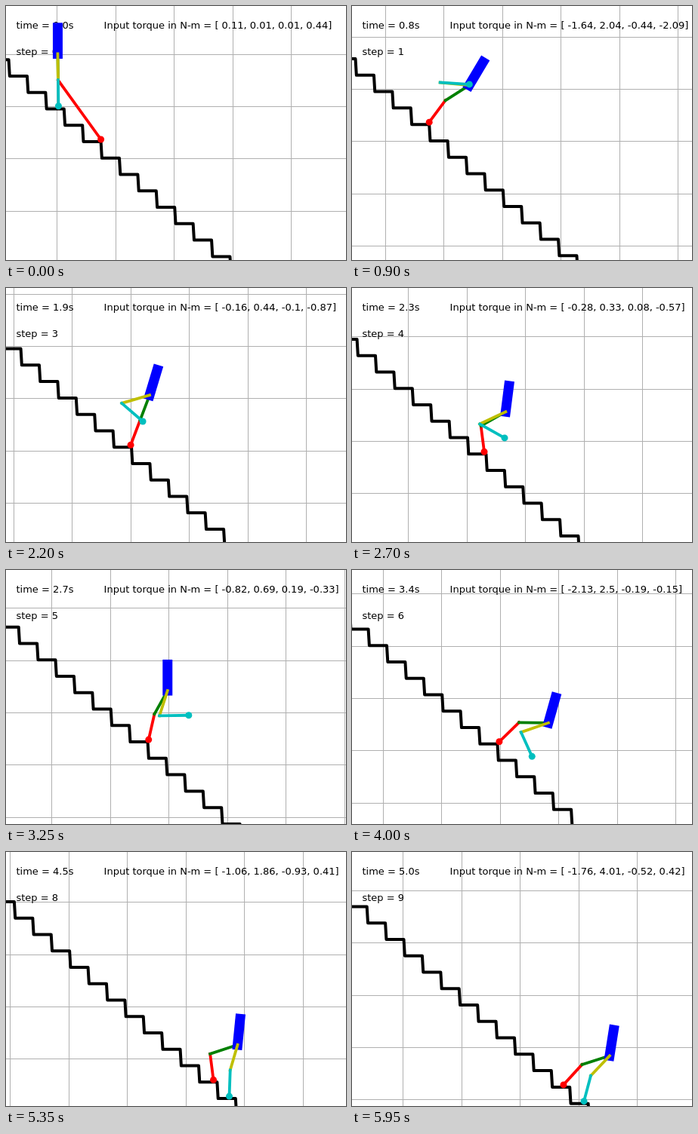
An HTML page that plays this animation: 450x337 px, repeating every 6 s.

```html
<!DOCTYPE html>
<html lang="en">
<head>
<meta charset="utf-8">
<title>Walker descending stairs</title>
<style>
html, body { margin: 0; width: 100%; height: 100%; overflow: hidden; background: #fff; }
svg { display: block; width: 450px; height: 337px; }
text { font: 13px "DejaVu Sans", sans-serif; white-space: pre; }
path, line { fill: none; }
.link { stroke-width: 3.8; stroke-linecap: square; }
</style>
</head>
<body>
<svg viewBox="0 0 450 337">
  <path id="grid" stroke="#b0b0b0" stroke-width="1"/>
  <path id="stairs" stroke="#000" stroke-width="4" stroke-linejoin="round"/>
  <text id="time" x="13.5" y="30"></text>
  <text id="step" x="13.5" y="65"></text>
  <text id="torque" x="129.6" y="30"></text>
  <line id="shin" class="link" stroke="#f00"/>
  <line id="thigh" class="link" stroke="#008000"/>
  <line id="body" stroke="#00f" stroke-width="13" stroke-linecap="square"/>
  <line id="swingThigh" class="link" stroke="#bfbf00"/>
  <line id="swingShin" class="link" stroke="#00bfbf"/>
  <circle id="foot" r="4.5" fill="#f00"/>
  <circle id="swingFoot" r="4.5" fill="#00bfbf"/>
</svg>
<script>
const FRAMES = 120, FRAME_MS = 50, STEP_FRAMES = 12, SECONDS_PER_FRAME = .0422;
const GRID = [77.5, 69.35], CAMERA = [1.3, 1.27];
const STAIR = [24.41, 21.77], CORNER = [125.6, 180];
const ASPECT = GRID[0] / GRID[1];   // vertical units are shorter on screen
const LINK = GRID[0] / 2, FOOT_LIFT = 3;

// Footholds, counted in stairs from the first foothold
const feet = [-2.3, 0, 1.9, 3.96, 4.9, 6.05, 7.1, 9.5, 11.8, 12.66, 13.77].map(s => [
  CORNER[0] + STAIR[0] * s,
  CORNER[1] + STAIR[1] * Math.ceil(s - .2) - FOOT_LIFT
]);

// Key poses: hip relative to the support foot, lean and [thigh, shin] in degrees
const poses = [
  { at: 0, hip: [-1, -70], lean: 0, torque: [.11, .01, .01, .44] },
  { at: 18, hip: [53, -49], lean: 28, swing: [-96, 86], torque: [-1.64, 2.04, -.44, -2.09] },
  { at: 44, hip: [25, -66], lean: 15, swing: [-72, 46], torque: [-.16, .44, -.1, -.87] },
  { at: 65, hip: [25, -65], lean: 0, swing: [-16, 91], torque: [-.82, .69, .19, -.33] },
  { at: 80, hip: [65, -25], lean: 14, swing: [-69, 22], torque: [-2.13, 2.5, -.19, -.15] },
  { at: 95, hip: [61, -28], lean: 4, torque: [-.69, .39, -1.13, .34] },
  { at: 119, hip: [61, -38.5], lean: 8, torque: [-1.76, 4.01, -.52, .42] }
];
const defaultSwing = { at: 6, swing: [-62, 58] };
const touchdownHip = [14, -66];

const $ = id => document.getElementById(id);
const rad = deg => deg * Math.PI / 180;
const add = (a, b) => a.map((v, i) => v + b[i]);
const stepAt = n => Math.floor(n / STEP_FRAMES);
const set = (id, attrs) => { for (const k in attrs) $(id).setAttribute(k, attrs[k]); };
const track = value => poses.map(p => [p.at].concat(value(p)));

const leanKeys = track(p => p.lean);
const torqueKeys = track(p => p.torque);
const hipKeys = track(p => add(feet[stepAt(p.at)], p.hip));
// Each touchdown brings the hip just ahead of the new support foot
for (let s = 1; s * STEP_FRAMES < FRAMES; s++) {
  const at = s * STEP_FRAMES;
  if (poses.every(p => Math.abs(p.at - at) > 2)) hipKeys.push([at, ...add(feet[s], touchdownHip)]);
}
hipKeys.sort((a, b) => a[0] - b[0]);

// Smooth curve through keys of the form [frame, ...values]
function spline(keys, n) {
  let i = 0;
  while (i < keys.length - 2 && keys[i + 1][0] <= n) i++;
  const a = keys[i], b = keys[i + 1], before = keys[i - 1] || a, after = keys[i + 2] || b;
  const span = b[0] - a[0], u = (n - a[0]) / span;
  return a.slice(1).map((p, j) => {
    const k = j + 1, c = b[k] - p;
    const m0 = (b[k] - before[k]) / (b[0] - before[0]) * span;
    const m1 = (after[k] - p) / (after[0] - a[0]) * span;
    return p + u * (m0 + u * (3 * c - 2 * m0 - m1 + u * (m0 + m1 - 2 * c)));
  });
}

const offset = (p, angle, length) =>
  add(p, [Math.sin(angle) * length, Math.cos(angle) * length / ASPECT]);

const angleTo = (a, b) => Math.atan2(b[0] - a[0], (b[1] - a[1]) * ASPECT);

// The knee bends backwards
function kneeOf(hip, foot) {
  const dx = hip[0] - foot[0], dy = (hip[1] - foot[1]) * ASPECT;
  const d = Math.hypot(dx, dy);
  const h = Math.sqrt(Math.max(0, LINK * LINK - d * d / 4)) / d;
  return [(hip[0] + foot[0]) / 2 + dy * h, (hip[1] + foot[1]) / 2 - dx * h / ASPECT];
}

function legAngles(hip, foot) {
  const knee = kneeOf(hip, foot);
  return [angleTo(hip, knee), angleTo(knee, foot)];
}

// Parabola through the lift-off, mid-swing and landing angles
function swingAngles(n) {
  const step = stepAt(n), first = step * STEP_FRAMES, last = STEP_FRAMES - 1;
  const start = legAngles(spline(hipKeys, first), feet[Math.max(0, step - 1)]);
  const end = legAngles(spline(hipKeys, first + last), feet[step + 1]);
  const mid = poses.find(p => p.swing && stepAt(p.at) === step) || defaultSwing;
  const u = (n - first) / last, w = mid.at % STEP_FRAMES / last;
  return start.map((a, k) => {
    const change = end[k] - a;
    const bump = (rad(mid.swing[k]) - a - change * w) / (w * (1 - w));
    return a + change * u + bump * u * (1 - u);
  });
}

function drawLine(id, a, b) { set(id, { x1: a[0], y1: a[1], x2: b[0], y2: b[1] }); }

function drawScene(cam) {
  const mod = (v, m) => ((v % m) + m) % m;
  const snap = v => Math.floor(v) + .5;
  let grid = "";
  for (let x = mod(67.5 - cam[0], GRID[0]); x < 450; x += GRID[0]) grid += `M${snap(x)} 0V337`;
  for (let y = mod(64 - cam[1], GRID[1]); y < 337; y += GRID[1]) grid += `M0 ${snap(y)}H450`;
  set("grid", { d: grid });

  let stairs = "";
  for (let m = -8; m < 24; m++) {
    const x = CORNER[0] + STAIR[0] * m - cam[0], y = CORNER[1] + STAIR[1] * m - cam[1];
    stairs += `${stairs ? "L" : "M"}${x - STAIR[0] + 1.3} ${y}L${x} ${y}`;
  }
  set("stairs", { d: stairs });
}

function draw(n) {
  const cam = CAMERA.map(v => v * n);
  const toScreen = p => [p[0] - cam[0], p[1] - cam[1]];
  const step = stepAt(n);
  drawScene(cam);

  const hipWorld = spline(hipKeys, n);
  const hip = toScreen(hipWorld);
  const knee = toScreen(kneeOf(hipWorld, feet[step]));
  // The opening step already marks the next foothold
  const foot = toScreen(feet[Math.max(1, step)]);
  const [thigh, shin] = swingAngles(n);
  const swingKnee = offset(hip, thigh, LINK);
  const swingFoot = offset(swingKnee, shin, LINK);
  const head = offset(hip, Math.PI - rad(spline(leanKeys, n)[0]), LINK);

  drawLine("shin", foot, knee);
  drawLine("thigh", knee, hip);
  drawLine("body", hip, head);
  drawLine("swingThigh", hip, swingKnee);
  drawLine("swingShin", swingKnee, swingFoot);
  set("foot", { cx: foot[0], cy: foot[1] });
  set("swingFoot", { cx: swingFoot[0], cy: swingFoot[1] });

  const torque = spline(torqueKeys, n).map(v => Math.round(v * 100) / 100);
  $("time").textContent = `time = ${(n * SECONDS_PER_FRAME).toFixed(1)}s`;
  $("step").textContent = `step = ${step}`;
  $("torque").textContent = `Input torque in N-m = [ ${torque.join(", ")}]`;
}

const began = performance.now();
function tick() {
  draw(Math.floor((performance.now() - began) / FRAME_MS) % FRAMES);
  requestAnimationFrame(tick);
}
tick();
</script>
</body>
</html>
```
